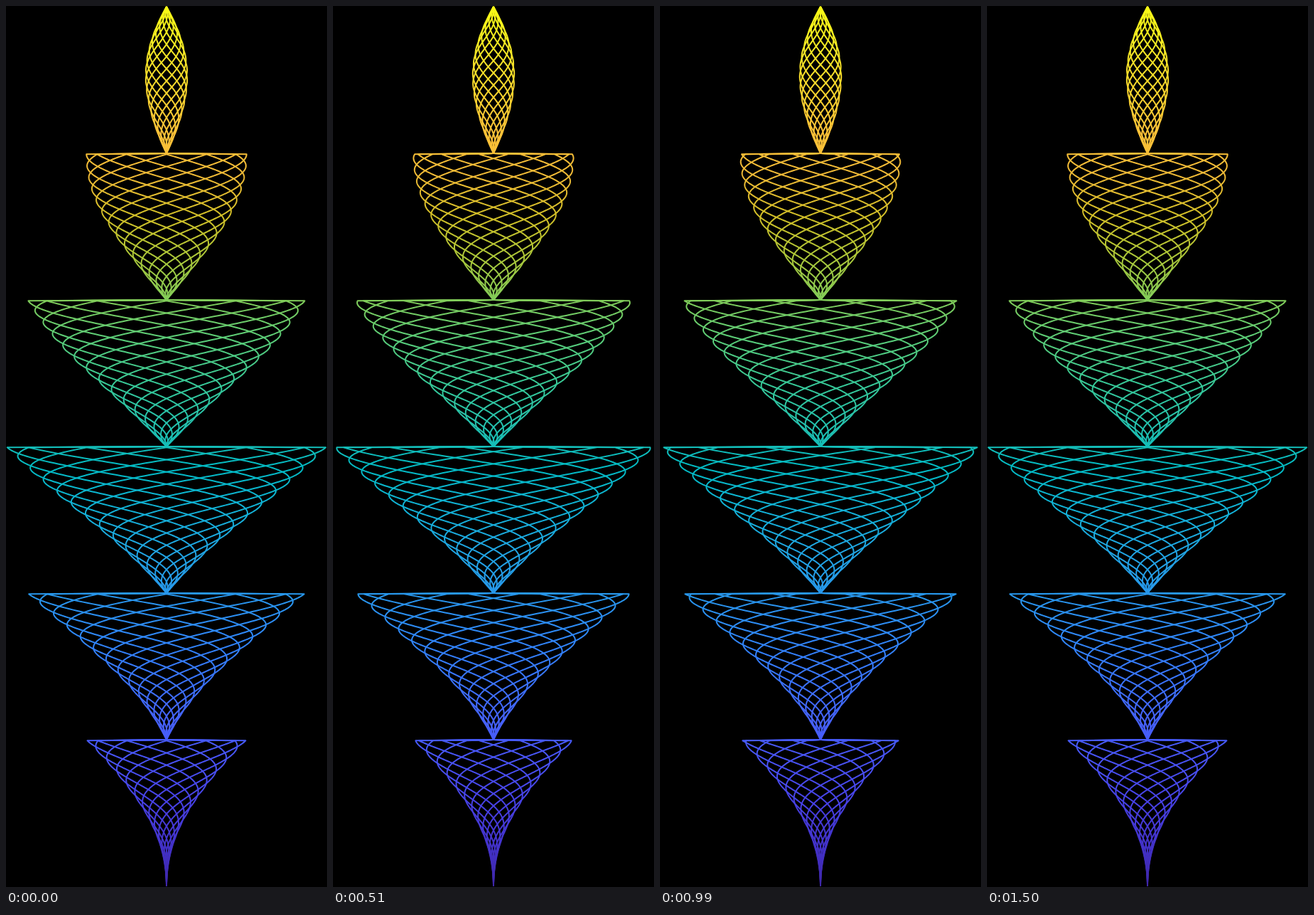
An HTML page with a canvas that plays this animation: 452x1238 px, repeating every 1530 ms.

```html
<!DOCTYPE html>
<html>
<head>
<meta charset="utf-8">
<style>
  html, body { margin: 0; background: #000; overflow: hidden; }
  canvas { display: block; }
</style>
</head>
<body>
<canvas width="452" height="1238"></canvas>
<script>
const ctx = document.querySelector('canvas').getContext('2d');
const STRANDS = 12, TIERS = 6, STEPS_PER_TIER = 150;
const STEPS = TIERS * STEPS_PER_TIER;
const CENTER = 226, RADIUS = 225.5, TOP = 1, HEIGHT = 1236;
const BULGE = 0.015;
const TICK = 30, TICKS = 51;

const palette = ('f9fb15 f5e924 fad62d fec338 f0ba36 d1bf27 abc739 81cc59 57cc7a 37c897 24c1ae ' +
  '02bac3 12b1d6 20a5e3 2797eb 2e87f7 3875fe 4563fd 4852f4 4741e5 4332cb 3e26a8').split(' ');
const gradient = ctx.createLinearGradient(0, TOP, 0, TOP + HEIGHT);
palette.forEach((color, i) => gradient.addColorStop(i / (palette.length - 1), '#' + color));

// Each tier shrinks to zero at its lower end, slightly full above and slim below;
// the next one starts wide a step further down.
function radius(step) {
  const rise = (STEPS - step) % STEPS_PER_TIER / STEPS_PER_TIER;
  const taper = rise - BULGE * Math.sin(2 * Math.PI * rise);
  return RADIUS * taper * Math.sin(Math.PI * step / STEPS);
}

function drawStrand(phase) {
  ctx.beginPath();
  for (let step = 0; step <= STEPS; step++) {
    const angle = 2 * Math.PI * (step - 1) / STEPS_PER_TIER - phase;
    ctx.lineTo(CENTER + radius(step) * Math.cos(angle), TOP + HEIGHT * step / STEPS);
  }
  ctx.stroke();
}

function draw() {
  const tick = Math.floor(performance.now() / TICK) % TICKS;
  const turn = tick / (TICKS - 1);
  ctx.fillStyle = '#000';
  ctx.fillRect(0, 0, 452, 1238);
  ctx.strokeStyle = gradient;
  ctx.lineWidth = 2;
  ctx.lineJoin = 'round';
  for (let i = 0; i < STRANDS; i++) drawStrand(2 * Math.PI * (i + turn) / STRANDS);
  requestAnimationFrame(draw);
}
draw();
</script>
</body>
</html>
```
